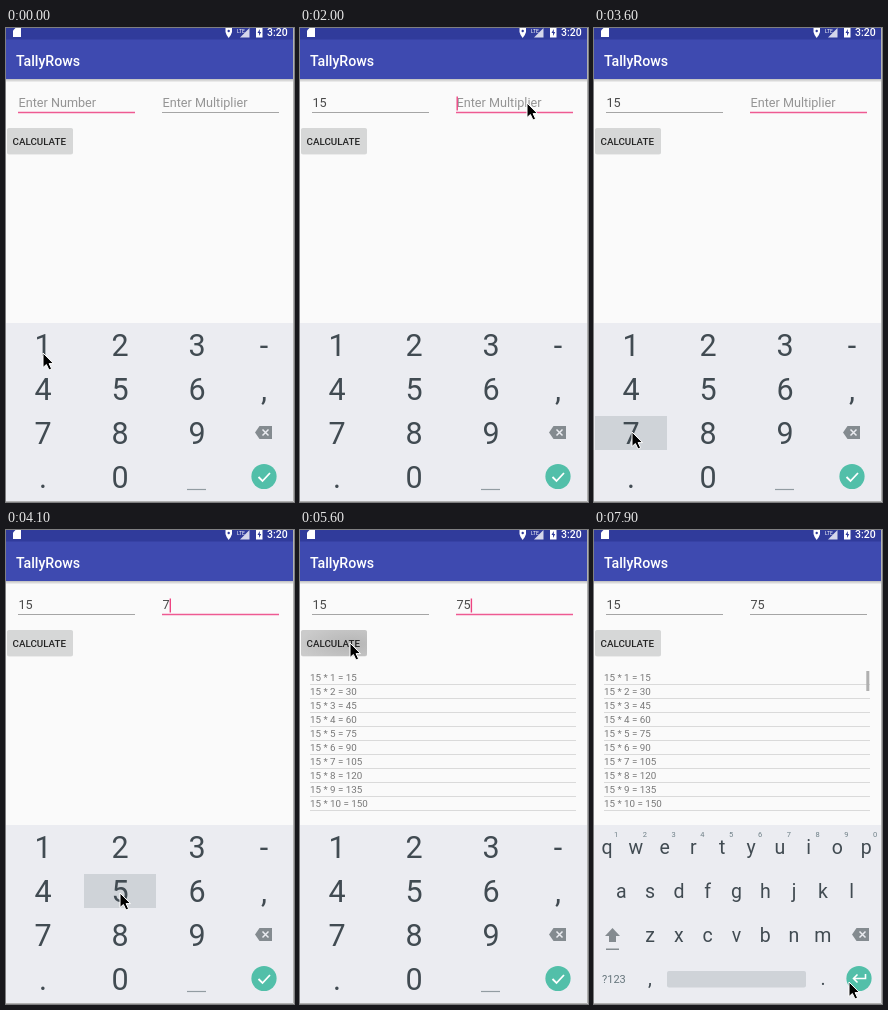
An HTML page that plays this animation: 288 px wide and 474 px high, repeating every 8000 ms.

```html
<!DOCTYPE html>
<html lang="en">
<head>
<meta charset="utf-8">
<title>Multiplication table demo</title>
<style>
  html, body { margin: 0; width: 100%; height: 100%; overflow: hidden; background: #fafafa; }
  svg { display: block; width: 288px; height: 474px; font-family: Roboto, sans-serif; }
  .mid { text-anchor: middle; }
  .field { font-size: 12.65px; }
  .key { font-size: 30.5px; fill: #414b52; }
  .letter { font-size: 19.5px; fill: #414b52; }
  .small { font-size: 7.5px; fill: #6f8088; }
  .row { font-size: 9.8px; fill: #777; }
</style>
</head>
<body>
<svg id="stage" viewBox="0 0 288 474">
  <defs>
    <linearGradient id="shade" x2="0" y2="1">
      <stop stop-color="#000" stop-opacity=".24"/>
      <stop offset="1" stop-color="#000" stop-opacity="0"/>
    </linearGradient>
    <radialGradient id="ripple" cx=".76" cy=".55" r=".8">
      <stop stop-color="#b5b5b5"/>
      <stop offset="1" stop-color="#cbcbcb"/>
    </radialGradient>
    <g id="erase">
      <path d="M0 6.5L4.500 0H17V13H4.500Z" fill="#848b90"/>
      <path d="M7.500 3.500l6 6m0-6l-6 6" stroke="#ebecf1" stroke-width="1.500"/>
    </g>
  </defs>
  <rect width="288" height="474" fill="#fafafa"/>
  <rect y="51" width="288" height="3.500" fill="url(#shade)"/>
  <rect width="288" height="51" fill="#3e4ab0"/>
  <rect width="288" height="11.500" fill="#303b9b"/>
  <g fill="#fff">
    <path d="M9.500 0H15V9H7V2.500Z"/>
    <path d="M219.500 0h6.500v4q-.5 2.500-3.300 6q-2.700-3.500-3.200-6z"/>
    <circle cx="222.700" cy="3" r="1.200" fill="#303b9b"/>
    <text x="231" y="4.500" font-size="5">LTE</text>
    <path d="M243.500 0V9.500H234Z" opacity=".8"/>
    <path d="M250 0h6.500v9.500H250z"/>
    <path d="M253.800 1l-2.300 4h1.500v3l2.200-4h-1.400z" fill="#303b9b"/>
    <text x="261" y="8" font-size="10.500" font-weight="500">3:20</text>
    <text x="10" y="37.500" font-size="14.200" font-weight="500">TallyRows</text>
  </g>
  <g class="field">
    <text id="number" x="12.500" y="79"/>
    <text id="factor" x="156.500" y="79"/>
  </g>
  <path id="line0" d="M12 84.500H129"/>
  <path id="line1" d="M156 84.500H273"/>
  <rect id="caret" y="68.500" width="1.400" height="14" fill="#ee4482"/>
  <rect x="1" y="100.500" width="66" height="26" rx="2" fill="#000" opacity=".12"/>
  <rect id="button" x="1" y="100" width="66" height="26" rx="2"/>
  <text x="6.500" y="117" font-size="9.800" font-weight="500" fill="#222">CALCULATE</text>
  <g id="table"></g>
  <rect id="scrollbar" x="272.300" y="141" width="3" height="20" fill="#b0b0b0"/>

  <rect y="295" width="288" height="179" fill="#ebecf1"/>
  <rect id="pressed" width="72" height="34" fill="#cfd3d8"/>
  <g id="numpad">
    <path d="M181 461.500H200" stroke="#929ca2" stroke-width="1.200"/>
    <use href="#erase" x="249" y="398"/>
    <circle id="done" cx="258" cy="448.500" r="12.600"/>
    <path d="M252.500 449l4 4l7.500-8" fill="none" stroke="#fff" stroke-width="1.800"/>
  </g>
  <g id="letters">
    <path d="M18.500 398l7.500 8h-4v6h-7v-6h-4zM12 418.500h13v1.500H12z" fill="#848b90"/>
    <use href="#erase" x="258" y="398"/>
    <rect x="73" y="441" width="139" height="16.500" rx="2" fill="#cfd3d8"/>
    <text x="8" y="452.500" font-size="11" fill="#66757c">?123</text>
    <circle cx="265" cy="448.500" r="12.600" fill="#52bfa9"/>
    <path d="M271.500 444v4.500H259.500m4-4l-4 4l4 4" fill="none" stroke="#fff" stroke-width="1.600"/>
  </g>
  <path d="M287.500 0V473.500H0" fill="none" stroke="#b0b0b0"/>
  <path id="pointer" d="M0 0V14.500L3.400 11.500L6 17L8.600 15.800L6.100 10.600H10.500Z" stroke="#fff" stroke-width="1"/>
</svg>
<script>
const $ = id => document.getElementById(id);
const LOOP = 8000, PINK = '#ee5a92';

function addText(parent, x, y, cls, content) {
  const node = document.createElementNS('http://www.w3.org/2000/svg', 'text');
  node.setAttribute('x', x);
  node.setAttribute('y', y);
  node.setAttribute('class', cls);
  node.textContent = content;
  parent.append(node);
}

const set = (id, attrs) => {
  for (const name in attrs) $(id).setAttribute(name, attrs[name]);
};
const show = (id, visible) => set(id, { visibility: visible ? 'visible' : 'hidden' });

// Number pad
['123-', '456,', '789', '.0'].forEach((keys, row) =>
  [...keys].forEach((key, col) =>
    addText($('numpad'), [37, 114, 191, 258][col], 327.5 + 44 * row, 'key mid', key)));

// Letter keyboard
['qwertyuiop', 'asdfghjkl', 'zxcvbnm'].forEach((keys, row) =>
  [...keys].forEach((key, i) => {
    const x = [13, 27.3, 56][row] + 28.8 * i;
    addText($('letters'), x, 323.5 + 44 * row, 'letter mid', key);
    if (!row) addText($('letters'), x + 9, 307, 'small mid', (i + 1) % 10);
  }));
addText($('letters'), 56, 455, 'letter mid', ',');
addText($('letters'), 229, 455, 'letter mid', '.');

// Result list
let dividers = '';
for (let i = 1; i <= 10; i++) {
  addText($('table'), 10, 137 + 14 * i, 'row', `15 * ${i} = ${15 * i}`);
  dividers += `M10 ${140.5 + 14 * i}H276`;
}
$('table').insertAdjacentHTML('beforeend', `<path d="${dividers}" stroke="#dadada"/>`);

// Pointer stops: time, x, y
const path = [
  [0, 37, 325], [500, 37, 325], [900, 89, 350], [1100, 113, 362], [1300, 113, 362],
  [1700, 240, 91], [1900, 227, 75], [2100, 227, 75], [2700, 72, 367], [3000, 53, 401],
  [3300, 38, 404], [3750, 38, 404], [4050, 114, 363], [4550, 114, 363],
  [5400, 50, 113], [5850, 50, 113], [6300, 255, 452], [LOOP, 255, 452]
];

// Key presses: start, end, column, row
const presses = [[250, 450, 0, 0], [1150, 1350, 1, 1], [3550, 3750, 0, 2], [4050, 4250, 1, 1]];

// Moments that restart the caret blink
const edits = [-500, 450, 1350, 1950, 3650, 4250];

function pointerAt(t) {
  const i = path.findIndex(stop => stop[0] > t);
  const [t0, x0, y0] = path[i - 1], [t1, x1, y1] = path[i];
  const p = (t - t0) / (t1 - t0);
  return [x0 + (x1 - x0) * p, y0 + (y1 - y0) * p];
}

function setField(id, value, hint) {
  $(id).textContent = value || hint;
  set(id, { fill: value ? '#4a4a4a' : '#959595' });
}

function draw(t) {
  const number = t < 450 ? '' : t < 1350 ? '1' : '15';
  const factor = t < 3650 ? '' : t < 4250 ? '7' : '75';
  const focus = t < 1950 ? 0 : t < 6550 ? 1 : -1;
  setField('number', number, 'Enter Number');
  setField('factor', factor, 'Enter Multiplier');
  [0, 1].forEach(i => set('line' + i, {
    stroke: i === focus ? PINK : '#a5a5a5',
    'stroke-width': i === focus ? 1.6 : 1
  }));

  const lastEdit = edits.filter(e => e <= t).pop();
  show('caret', focus >= 0 && (t - lastEdit) % 1000 < 500);
  set('caret', { x: focus ? 156.5 + 7.1 * factor.length : 12.5 + 7.1 * number.length });

  const press = presses.find(([from, to]) => t >= from && t < to);
  show('pressed', press);
  if (press) set('pressed', { x: 1 + 77 * press[2], y: 300 + 44 * press[3] });

  set('button', { fill: t >= 5550 && t < 5650 ? 'url(#ripple)' : '#d6d7d7' });
  set('done', { fill: t >= 6450 ? '#48a996' : '#52bfa9' });
  show('table', t >= 5550);
  show('scrollbar', focus < 0);
  show('numpad', focus >= 0);
  show('letters', focus < 0);
  set('pointer', { transform: `translate(${pointerAt(t)})` });
}

function tick() {
  draw(performance.now() % LOOP);
  requestAnimationFrame(tick);
}
tick();
</script>
</body>
</html>
```
